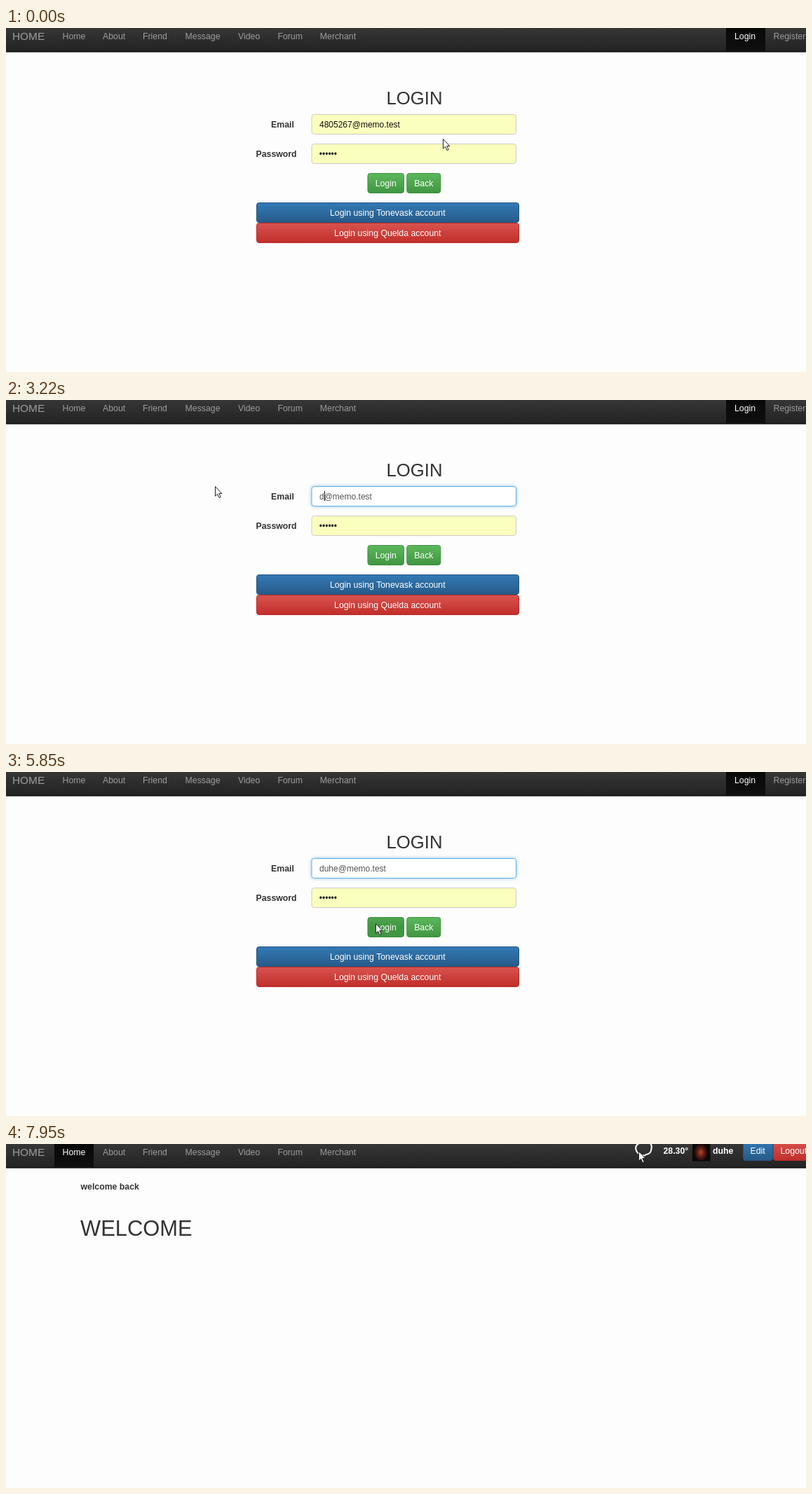
An HTML page that plays this animation: 1141x491 px, repeating every 8 s.

```html
<!DOCTYPE html>
<html lang="en">
<head>
<meta charset="utf-8">
<title>Login demo</title>
<style>
  html, body { margin: 0; width: 100%; height: 100%; overflow: hidden; background: #fdfdfd; }
  svg { display: block; width: 100%; height: 100%; }
  text { font: 12.3px "Liberation Sans", Arial, sans-serif; fill: #333; }
  .bold { font-weight: bold; }
  .heading { font-size: 25.7px; }
  .welcome { font-size: 30.9px; }
  .nav text { fill: #9d9d9d; }
  .nav .brand { font-size: 15.4px; }
  .nav .white, .button text { fill: #fff; }
  .center text { text-anchor: middle; }
  .field { fill: #faffbd; stroke: #ccc; }
  .field.focus { stroke: #66afe9; filter: drop-shadow(0 0 2.5px rgba(102, 175, 233, .7)); }
  .field.edited { fill: #fff; }
  .value { font-size: 12px; fill: #111; }
  .value.edited { fill: #555; }
  .option { font: bold 13.33px "Noto Sans", "Open Sans", sans-serif; fill: #000; }
  .green { fill: url(#green); stroke: #3e8f3e; }
  .green.hover { fill: url(#greenHover); }
  .blue { fill: url(#blue); stroke: #245580; }
  .red { fill: url(#red); stroke: #b92c28; }
</style>
</head>
<body>
<svg viewBox="0 0 1141 491">
  <defs>
    <linearGradient id="bar" x2="0" y2="1"><stop stop-color="#363636"/><stop offset="1" stop-color="#222"/></linearGradient>
    <linearGradient id="active" x2="0" y2="1"><stop stop-color="#080808"/><stop offset="1" stop-color="#0f0f0f"/></linearGradient>
    <linearGradient id="green" x2="0" y2="1"><stop stop-color="#5cb85c"/><stop offset="1" stop-color="#419641"/></linearGradient>
    <linearGradient id="greenHover" x2="0" y2="1"><stop stop-color="#4fa74f"/><stop offset=".5" stop-color="#419641"/></linearGradient>
    <linearGradient id="blue" x2="0" y2="1"><stop stop-color="#337ab7"/><stop offset="1" stop-color="#265a88"/></linearGradient>
    <linearGradient id="red" x2="0" y2="1"><stop stop-color="#d9534f"/><stop offset="1" stop-color="#c12e2a"/></linearGradient>
    <radialGradient id="portrait"><stop stop-color="#b5472c"/><stop offset=".5" stop-color="#5e1d14"/><stop offset="1" stop-color="#0d0808"/></radialGradient>
  </defs>

  <g class="nav">
    <rect width="1141" height="34" fill="url(#bar)"/>
    <rect y="33.4" width="1141" height="1.2" fill="#080808"/>
    <rect id="homeActive" x="69" width="56" height="33.5" fill="url(#active)"/>
    <text class="brand" x="9" y="17">HOME</text>
    <text id="homeLink" x="80.5" y="16.3">Home</text>
    <text x="138" y="16.3">About</text>
    <text x="195" y="16.3">Friend</text>
    <text x="255.6" y="16.3">Message</text>
    <text x="331" y="16.3">Video</text>
    <text x="387.4" y="16.3">Forum</text>
    <text x="447.8" y="16.3">Merchant</text>
    <g id="guestBar">
      <rect x="1027" width="56" height="33.5" fill="url(#active)"/>
      <text class="white" x="1039" y="16.3">Login</text>
      <text x="1094.5" y="16.3">Register</text>
    </g>
    <g id="userBar">
      <path d="M903-1Q897 2 898.500 8Q900 14 905 14.500Q909 18.500 913 15Q920 14 920.500 7Q921.500 2 919-1" fill="none" stroke="#fff" stroke-width="2"/>
      <text class="bold white" x="937.5" y="14.3">28.30°</text>
      <rect x="979" y="-1" width="25.500" height="25.500" fill="#0d0808"/>
      <ellipse cx="991" cy="12" rx="10" ry="13" fill="url(#portrait)"/>
      <text class="bold white" x="1008" y="14.3">duhe</text>
      <g class="button">
        <rect class="blue" x="1051.5" y="-5.500" width="42" height="29" rx="3.4"/>
        <text x="1061.5" y="14">Edit</text>
        <rect class="red" x="1094.5" y="-5.500" width="60" height="29" rx="3.4"/>
        <text x="1104.5" y="14">Logout</text>
      </g>
    </g>
  </g>

  <g id="loginPage">
    <text class="heading" x="542.5" y="109">LOGIN</text>
    <text class="bold" x="378" y="142">Email</text>
    <text class="bold" x="356.5" y="184">Password</text>
    <rect class="field" x="436" y="165.5" width="291.500" height="28" rx="3.4"/>
    <text class="value" x="446.800" y="184">••••••</text>
    <rect id="emailField" class="field" x="436" y="123.5" width="291.500" height="28" rx="3.4"/>
    <rect id="selection" x="447" y="130" height="14" fill="#39f"/>
    <text id="email" class="value" x="447" y="142"><tspan></tspan><tspan style="fill:#fff"></tspan><tspan></tspan></text>
    <rect id="caret" y="130" width="1" height="14" fill="#111"/>
    <g id="suggestion">
      <rect x="436.500" y="152.500" width="291" height="21" fill="#fff" stroke="#ccc"/>
      <text class="option" x="444" y="167.500">4805267@memo.test</text>
    </g>
    <g class="button center">
      <rect id="loginButton" class="green" x="516" y="207.500" width="51.500" height="28" rx="3.4"/>
      <text x="541.7" y="226">Login</text>
      <rect class="green" x="571.800" y="207.500" width="48" height="28" rx="3.4"/>
      <text x="595.8" y="226">Back</text>
      <rect class="blue" x="357.5" y="249.500" width="374" height="28" rx="3.4"/>
      <text x="544.300" y="268">Login using Tonevask account</text>
      <rect class="red" x="357.5" y="278.500" width="374" height="28" rx="3.4"/>
      <text x="544.300" y="297">Login using Quelda account</text>
    </g>
  </g>

  <g id="welcomePage">
    <text class="bold" x="106.5" y="64.500">welcome back</text>
    <text class="welcome" x="106" y="130.500">WELCOME</text>
  </g>

  <g id="pointer">
    <path id="arrow" d="M.5.5V14.200L3.500 11.300L6 16.600L8.200 15.600L5.800 10.500H9.800Z" fill="#fff" stroke="#222"/>
    <path id="beam" d="M-3-6.500H-1L0-5.500L1-6.500H3M0-5.500V5.500M-3 6.500H-1L0 5.500L1 6.500H3" fill="none" stroke="#222"/>
  </g>
</svg>
<script>
  const LOOP = 8000, STEP = 58;
  const TYPED = "duhe", DIGITS = "4805267", DOMAIN = "@memo.test";
  const KEY_TIMES = [3220, 3460, 3580, 3800];
  // Pointer stops: time, x, y
  const STOPS = [
    [0, 623, 158], [250, 621, 169], [690, 584, 142], [870, 584, 142],
    [1050, 587, 141], [1340, 587, 141], [1640, 535, 137], [1760, 527, 136],
    [1880, 503, 136], [2070, 495, 136], [2190, 491, 136], [2370, 380, 126],
    [2540, 298, 123], [5100, 298, 123], [5850, 527, 216], [7130, 527, 216],
    [7600, 984, 8], [7890, 910, 14], [7950, 902, 10], [LOOP, 902, 10]
  ];
  const $ = id => document.getElementById(id);
  const show = (id, on) => $(id).style.display = on ? "" : "none";
  const within = (t, from, to) => t >= from && t < to;
  const inside = (p, x, y, w, h) => within(p.x, x, x + w) && within(p.y, y, y + h);

  function pointerAt(t) {
    const i = STOPS.findIndex((stop, n) => within(t, stop[0], STOPS[n + 1][0]));
    const [t0, x0, y0] = STOPS[i], [t1, x1, y1] = STOPS[i + 1];
    const held = Math.floor((t - t0) / STEP) * STEP;
    const u = held / (t1 - t0), k = u * u * (3 - 2 * u);
    return { x: Math.round(x0 + (x1 - x0) * k), y: Math.round(y0 + (y1 - y0) * k) };
  }

  function drawEmail(t, pointer) {
    const typed = KEY_TIMES.filter(time => t >= time).length;
    const name = typed ? TYPED.slice(0, typed) : DIGITS;
    let start = name.length;
    if (within(t, 2200, 3220)) {
      start = Math.max(0, Math.min(start, Math.round((pointer.x - 447) / 6.67)));
    }
    const email = $("email");
    [name.slice(0, start), name.slice(start), DOMAIN].forEach((part, i) => email.children[i].textContent = part);

    const widthOf = count => count ? email.getSubStringLength(0, count) : 0;
    const left = widthOf(start), right = widthOf(name.length);
    $("selection").setAttribute("x", 447 + left);
    $("selection").setAttribute("width", right - left);

    const caretOn = within(t, 870, 1370) || within(t, 1870, 2200) ||
      within(t, 3220, 4290) || within(t, 4780, 5290);
    show("caret", caretOn && start === name.length);
    const index = t < 2130 ? name.length + DOMAIN.length : name.length;
    $("caret").setAttribute("x", Math.round(447 + widthOf(index)));

    $("emailField").classList.toggle("focus", t >= 870);
    $("emailField").classList.toggle("edited", typed > 0);
    email.classList.toggle("edited", typed > 0);
    show("suggestion", within(t, 870, 3220));
  }

  function draw(t) {
    const pointer = pointerAt(t), onLogin = t < 6090;
    show("loginPage", onLogin);
    show("guestBar", onLogin);
    show("userBar", t >= 6140);
    show("welcomePage", t >= 6390);
    show("homeActive", t >= 6390);
    $("homeLink").classList.toggle("white", t >= 6390);
    if (onLogin) drawEmail(t, pointer);

    $("loginButton").classList.toggle("hover", inside(pointer, 516, 207, 52, 29));
    const overField = inside(pointer, 436, 123, 292, 29) || inside(pointer, 436, 165, 292, 29);
    const beam = onLogin && (overField || within(t, 2100, 2540));
    show("beam", beam);
    show("arrow", !beam);
    const offset = beam ? .5 : 0;
    $("pointer").setAttribute("transform", `translate(${pointer.x + offset} ${pointer.y + offset})`);
  }

  const begin = performance.now();
  function tick() {
    draw((performance.now() - begin) % LOOP);
    requestAnimationFrame(tick);
  }
  tick();
</script>
</body>
</html>
```
